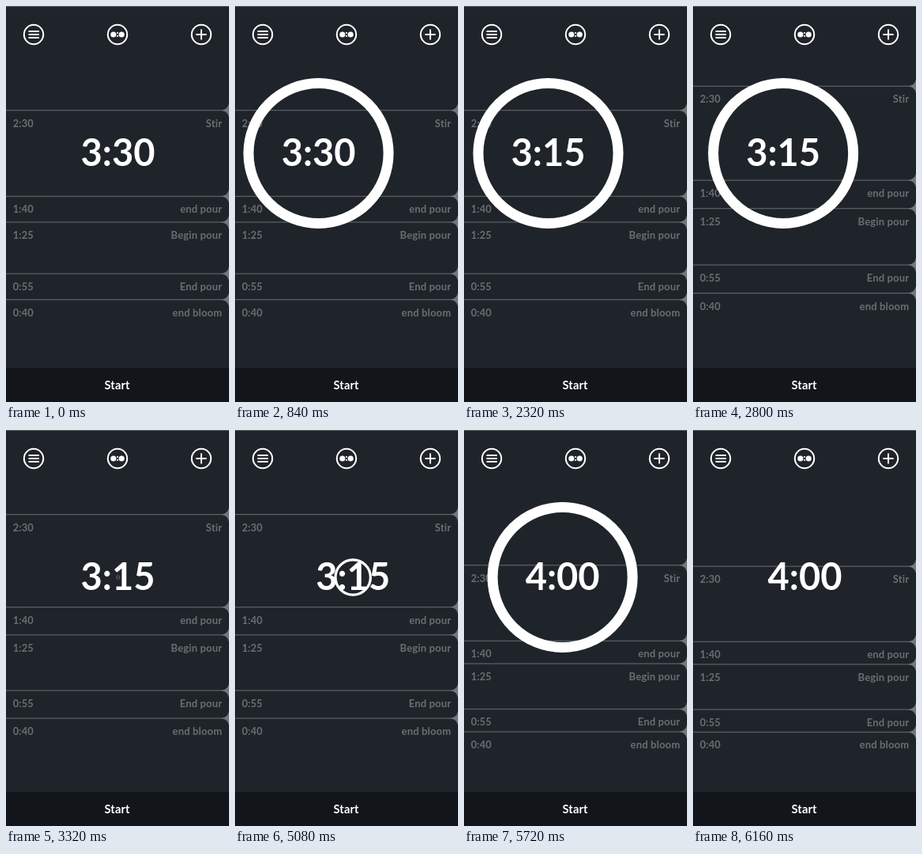
These frames come from a looping animation (282x500 px, 8000 ms). An HTML page with a canvas:

```html
<!DOCTYPE html>
<html lang="en">
<head>
<meta charset="utf-8">
<title>Pour timer</title>
<style>
  html, body { margin: 0; width: 100%; height: 100%; overflow: hidden; background: #1f242a; }
  canvas { display: block; width: 100vw; height: 100vh; }
</style>
</head>
<body>
<canvas id="stage"></canvas>
<script>
const W = 282, H = 500, LOOP = 8000;
const CARD = '#1f242a', BAR = '#12151a', LINE = '#5d6164', EDGE = '#747779', LABEL = '#6b6e71', WHITE = '#fff';
const BASE = 457.6, SPAN = 456.3, RING_Y = 186, RING_R = 95, CORNER = 10;

const steps = [
  [150, 'Stir'], [100, 'end pour'], [85, 'Begin pour'], [55, 'End pour'], [40, 'end bloom']
];

// Each drag: when the ring shows, when it is let go, and its path as [time, x].
const drags = [
  { show: 558, release: 2565, path: [[540, 136], [1000, 94], [1310, 94], [1600, 101.5],
    [2060, 118], [2110, 118], [2310, 106.5], [2590, 106.5], [3290, 141.5]] },
  { show: 5078, release: 5378, path: [[5060, 149.5], [5440, 115], [6130, 141.5]] }
];

// Total time in seconds from a given moment on.
const totals = [[0, 210], [1470, 195], [5190, 210], [5285, 225], [5375, 240]];

const canvas = document.getElementById('stage');
const ctx = canvas.getContext('2d');

const clamp = u => Math.min(1, Math.max(0, u));
const mix = (a, b, u) => a + (b - a) * u;
const smooth = u => u * u * (3 - 2 * u);
const clock = s => Math.floor(s / 60) + ':' + String(s % 60).padStart(2, '0');

function spring(t) {
  if (t <= 0) return 0;
  const w = 0.0157, a = 0.0069;
  return 1 - Math.exp(-a * t) * (Math.cos(w * t) + a / w * Math.sin(w * t));
}

function along(path, t) {
  const last = path[path.length - 1];
  if (t >= last[0]) return last[1];
  const i = Math.max(1, path.findIndex(p => p[0] > t));
  const [t0, x0] = path[i - 1], [t1, x1] = path[i];
  return mix(x0, x1, smooth(clamp((t - t0) / (t1 - t0))));
}

function ringScale(drag, t) {
  const grow = clamp((t - drag.show + 38) / 305);
  const shrink = clamp((t - drag.release - 420) / 340);
  return (1 - (1 - grow) ** 2) * (1 - shrink ** 2);
}

function text(str, x, y, size, color, align, gap = 0) {
  ctx.font = `bold ${size}px Lato, "Open Sans", sans-serif`;
  ctx.letterSpacing = gap + 'px';
  ctx.textAlign = align;
  ctx.fillStyle = color;
  ctx.fillText(str, x, y);
}

function dot(x, y, r) {
  ctx.beginPath();
  ctx.arc(x, y, r, 0, 7);
  ctx.fill();
}

function stroke(x0, y0, x1, y1) {
  ctx.beginPath();
  ctx.moveTo(x0, y0);
  ctx.lineTo(x1, y1);
  ctx.stroke();
}

function ring(x, y, outer, width) {
  ctx.lineWidth = width;
  ctx.beginPath();
  ctx.arc(x, y, outer - width / 2, 0, 7);
  ctx.stroke();
}

function drawIcons() {
  ctx.strokeStyle = ctx.fillStyle = WHITE;
  for (const x of [35, 141, 247]) ring(x, 36, 13.2, 2);
  for (const y of [32, 36, 40]) stroke(28.5, y, 41.8, y);
  dot(135.8, 36, 3.6);
  dot(146.2, 36, 3.6);
  dot(141, 34, 1.1);
  dot(141, 38, 1.1);
  stroke(240.4, 36, 253.6, 36);
  stroke(247, 29.4, 247, 42.6);
}

function drawStep(seconds, label, scale) {
  const y = BASE - seconds * scale;
  ctx.fillStyle = LINE;
  ctx.fillRect(0, y - 0.6, W, 1.2);
  // Gap between the rounded corners of two neighbouring cards
  ctx.fillStyle = EDGE;
  ctx.beginPath();
  ctx.moveTo(W - CORNER, y);
  ctx.quadraticCurveTo(W - 1.5, y - 1, W, y - CORNER + 1);
  ctx.lineTo(W, y + CORNER - 1);
  ctx.quadraticCurveTo(W - 1.5, y + 1, W - CORNER, y);
  ctx.fill();
  text(clock(seconds), 8.8, y + 21, 12.8, LABEL, 'left', 0.1);
  text(label, 273.2, y + 21, 13, LABEL, 'right', 0.15);
}

function draw(t) {
  const dpr = window.devicePixelRatio || 1;
  const w = Math.round(innerWidth * dpr), h = Math.round(innerHeight * dpr);
  if (canvas.width !== w || canvas.height !== h) {
    canvas.width = w;
    canvas.height = h;
  }
  ctx.setTransform(w / W, 0, 0, h / H, 0, 0);
  ctx.fillStyle = CARD;
  ctx.fillRect(0, 0, W, H);
  ctx.fillStyle = LINE;
  ctx.fillRect(0, 0, W, 1);

  let scale = mix(SPAN / 210, SPAN / 195, spring(t - drags[0].release));
  if (t > drags[1].release) scale = mix(SPAN / 195, SPAN / 240, spring(t - drags[1].release));
  for (const [seconds, label] of steps) drawStep(seconds, label, scale);

  drawIcons();

  const drag = drags.filter(d => t >= d.show).pop();
  const x = drag ? along(drag.path, t) : 141.5;
  const total = totals.filter(v => t >= v[0]).pop()[1];
  const size = drag ? ringScale(drag, t) : 0;
  if (size > 0.01) {
    ctx.strokeStyle = WHITE;
    ring(x, RING_Y, RING_R * size, 13 * size);
  }
  text(clock(total), x, 202, 47, WHITE, 'center');

  ctx.fillStyle = BAR;
  ctx.fillRect(0, 457, W, H - 457);
  text('Start', 140.6, 484, 14.6, WHITE, 'center', 0.15);
}

function frame() {
  draw(performance.now() % LOOP);
  requestAnimationFrame(frame);
}
frame();
</script>
</body>
</html>
```
